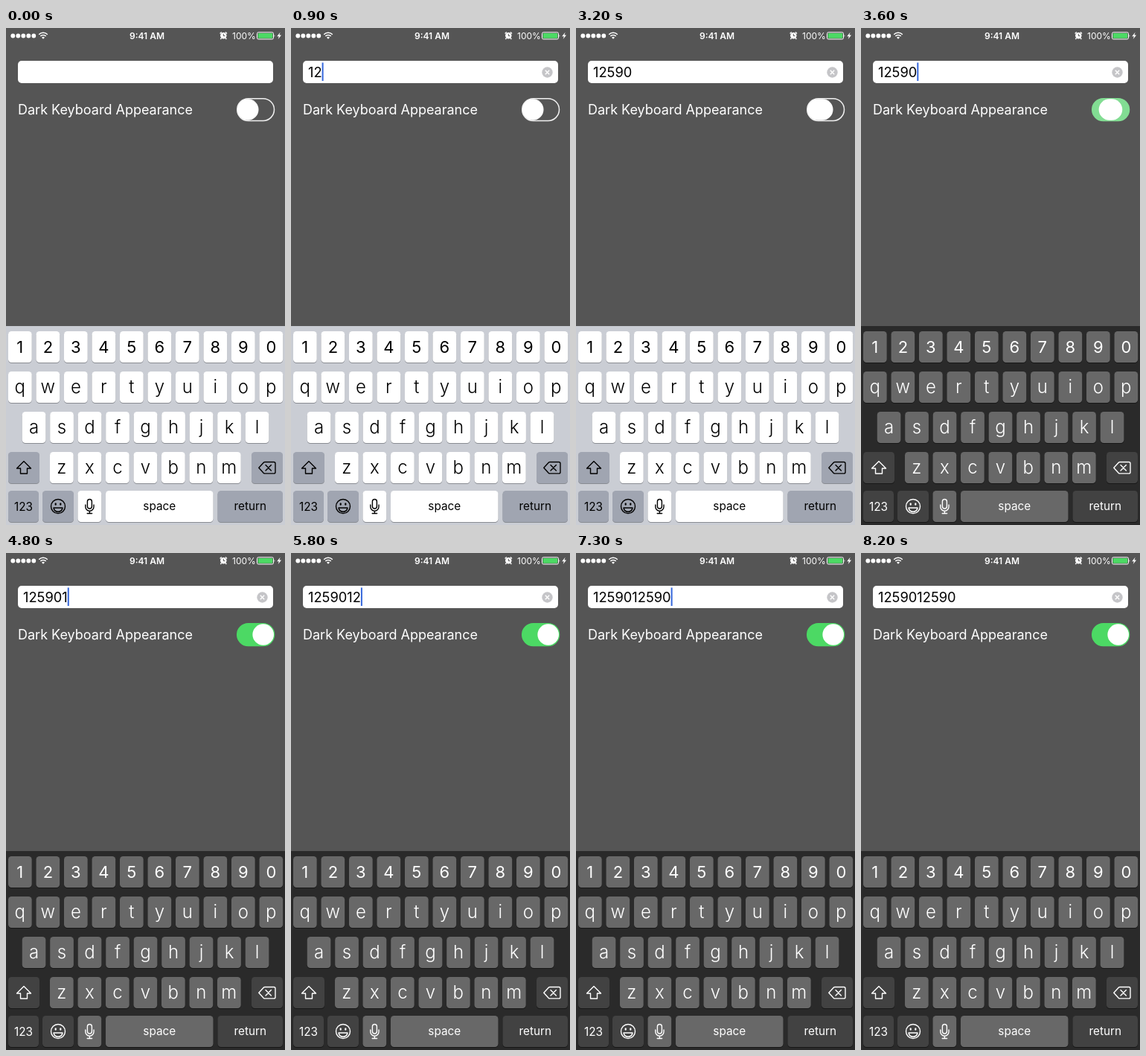
Animation, 375 px wide and 667 px high, one loop 8300 ms. Source, as an HTML page:

```html
<!DOCTYPE html>
<html lang="en">
<head>
<meta charset="utf-8">
<title>Dark keyboard</title>
<style>
html, body { margin: 0; width: 100%; height: 100%; overflow: hidden; background: #555; }
svg { display: block; width: 375px; height: 667px; font-family: Inter, Roboto, sans-serif; }
#board { --bg: #cacdd4; --key: #fff; --fn: #a0a5b1; --edge: #898c92; --ink: #000; }
#board.dark { --bg: #2a2a2a; --key: #686868; --fn: #424242; --edge: #171717; --ink: #fff; }
#board text { fill: var(--ink); text-anchor: middle; }
.bg { fill: var(--bg); }
.key { fill: var(--key); }
.fn { fill: var(--fn); }
.edge { fill: var(--edge); }
.line { fill: none; stroke: var(--ink); stroke-width: 1.4; stroke-linejoin: round; stroke-linecap: round; }
.solid { fill: var(--ink); }
.white { fill: none; stroke: #fff; }
</style>
</head>
<body>
<svg viewBox="0 0 375 667">
  <rect width="375" height="667" fill="#555"/>
  <g fill="#fff">
    <g id="dots"></g>
    <path d="M50 14.8l-2-2.1a2.9 2.9 0 0 1 4 0z"/>
    <g class="white" stroke-width="1.5">
      <path d="M46.3 10.9a5.3 5.3 0 0 1 7.4 0M44.2 8.7a8.3 8.3 0 0 1 11.6 0"/>
    </g>
    <text x="189.5" y="14.6" font-size="12" font-weight="600" text-anchor="middle">9:41 AM</text>
    <circle cx="292.3" cy="10.2" r="4.2"/>
    <path class="white" stroke-width="1.4" d="M287.6 7.6l2.2-2M297 7.6l-2.2-2M289.5 13.5l-1.2 1.5M295.1 13.5l1.2 1.5"/>
    <path d="M292.3 7.8v2.7h2" fill="none" stroke="#555"/>
    <text x="304" y="14.6" font-size="12">100%</text>
    <rect class="white" x="337.5" y="5.8" width="22" height="9.2" rx="1.8"/>
    <rect x="338.7" y="7" width="19.6" height="6.8" rx=".8" fill="#4cd964"/>
    <path d="M360.6 8.7q1.6 1.7 0 3.4z"/>
    <path d="M368.6 5.8l-4.4 5.4h2.7l-1.2 3.9 4.4-5.5h-2.7z"/>
    <rect x="16" y="44" width="343" height="30" rx="5"/>
    <text x="16" y="116" font-size="18">Dark Keyboard Appearance</text>
  </g>
  <text id="entry" x="23" y="66" font-size="18.3"></text>
  <rect id="caret" y="46.5" width="2" height="24.5" fill="#3567dc"/>
  <g id="clear">
    <circle cx="344.5" cy="59.5" r="7.2" fill="#c5c5c8"/>
    <path class="white" stroke-width="1.4" d="M341.8 56.8l5.4 5.4m0-5.4l-5.4 5.4"/>
  </g>
  <rect id="track" x="310.7" y="94.7" width="49.8" height="29.8" rx="14.9" stroke-width="1.5"/>
  <rect id="knob" y="95.2" height="28.6" rx="14.3" fill="#fff"/>
  <g id="board"></g>
</svg>
<script>
const LOOP = 8300, STEP = 100;
const $ = id => document.getElementById(id);
const board = $("board"), entry = $("entry"), caret = $("caret");
const track = $("track"), knob = $("knob");

function key(x, y, w, label = "", size = 24, drop = 8, kind = "key") {
  const box = (cls, dy) =>
    `<rect class="${cls}" x="${x}" y="${y + dy}" width="${w}" height="42" rx="4.5"/>`;
  return box("edge", 1) + box(kind, 0) +
    `<text x="${x + w / 2}" y="${y + 21 + drop}" font-size="${size}"` +
    ` font-weight="${size === 24 ? 300 : 400}">${label}</text>`;
}

const row = (chars, x, y, size, drop) =>
  [...chars].map((c, i) => key(x + i * 37.5, y, 31.7, c, size, drop)).join("");

$("dots").innerHTML = [0, 1, 2, 3, 4]
  .map(i => `<circle cx="${9.3 + i * 7}" cy="10.5" r="2.9"/>`).join("");

board.innerHTML =
  `<rect class="bg" y="400" width="375" height="267"/>` +
  row("1234567890", 3, 407, 22, 8) +
  row("qwertyuiop", 3, 461) +
  row("asdfghjkl", 21.7, 515) +
  row("zxcvbnm", 59, 569) +
  key(3, 569, 42, "", 16, 0, "fn") +
  key(330, 569, 42, "", 16, 0, "fn") +
  key(3, 621, 41, "123", 15.3, 6, "fn") +
  key(49, 621, 42, "", 16, 0, "fn") +
  key(96.5, 621, 31.7) +
  key(134, 621, 144.5, "space", 15.3, 5) +
  key(284.5, 621, 87.5, "return", 15.3, 5, "fn") +
  `<g class="line">
    <path d="M24 581.5l9.5 9.5h-5v7h-9v-7h-5z"/>
    <path d="M339.8 590.2l6.4-7q.7-.7 1.6-.7H360q2 0 2 2v11.4q0 2-2 2h-12.2q-.9 0-1.6-.7z"/>
    <path d="M349 586.5l7.4 7.4m0-7.4l-7.4 7.4"/>
    <circle cx="70" cy="642" r="9.5"/>
    <path d="M64 644h12q-1 5.2-6 5.2t-6-5.2z"/>
    <rect x="109.4" y="632.5" width="6" height="12.5" rx="3"/>
    <path d="M106.8 640v2.5a5.6 5.6 0 0 0 11.2 0V640M112.4 648.2v3.3m-3.2 0h6.4"/>
  </g>
  <ellipse class="solid" cx="66.7" cy="639" rx="1.2" ry="1.7"/>
  <ellipse class="solid" cx="73.3" cy="639" rx="1.2" ry="1.7"/>`;

// Piecewise linear value through [time, value] points.
function along(points, t) {
  const i = points.findIndex(p => p[0] > t);
  if (i < 0) return points[points.length - 1][1];
  if (i === 0) return points[0][1];
  const [t0, a] = points[i - 1], [t1, b] = points[i];
  return a + (b - a) * (t - t0) / (t1 - t0);
}

const mix = (a, b, p) =>
  `rgb(${a.map((v, i) => Math.round(v + (b[i] - v) * p))})`;

const digits = "1259012590";
const presses = [200, 700, 1300, 1900, 2300, 4600, 5200, 5900, 6500, 7300];
const blink = [[100, 0], [200, 1], [1900, 1], [2000, .75], [2200, .75], [2300, 1],
  [3000, 1], [3200, 0], [3400, 0], [3600, 1], [3900, 1], [4100, 0], [4400, 0], [4600, 1],
  [6300, 1], [6400, .75], [6500, 1], [8000, 1], [8200, 0]];
const stretch = [[3000, 0], [3200, 6], [3500, 6], [3700, 0]];
const slide = [[3400, 0], [3800, 1]];
const gray = [85, 85, 85], white = [240, 240, 240];
const pale = [130, 221, 147], green = [76, 217, 100];

function draw(now) {
  const t = Math.floor(now % LOOP / STEP) * STEP;
  const typed = digits.slice(0, presses.filter(p => p <= t).length);
  if (entry.textContent !== typed) entry.textContent = typed;
  caret.setAttribute("x", 23 + entry.getComputedTextLength());
  caret.setAttribute("opacity", along(blink, t));
  $("clear").setAttribute("opacity", typed ? 1 : 0);

  const p = along(slide, t), s = along(stretch, t);
  const early = p < .5, q = early ? p * 2 : p * 2 - 1;
  track.setAttribute("fill", early ? mix(gray, pale, q) : mix(pale, green, q));
  track.setAttribute("stroke", early ? mix(white, pale, q) : mix(pale, green, q));
  knob.setAttribute("x", 310.9 + p * (20.5 - s));
  knob.setAttribute("width", 28.6 + s);
  board.classList.toggle("dark", t >= 3500);
}

const start = performance.now();
function frame() {
  draw(performance.now() - start);
  requestAnimationFrame(frame);
}
frame();
</script>
</body>
</html>
```
